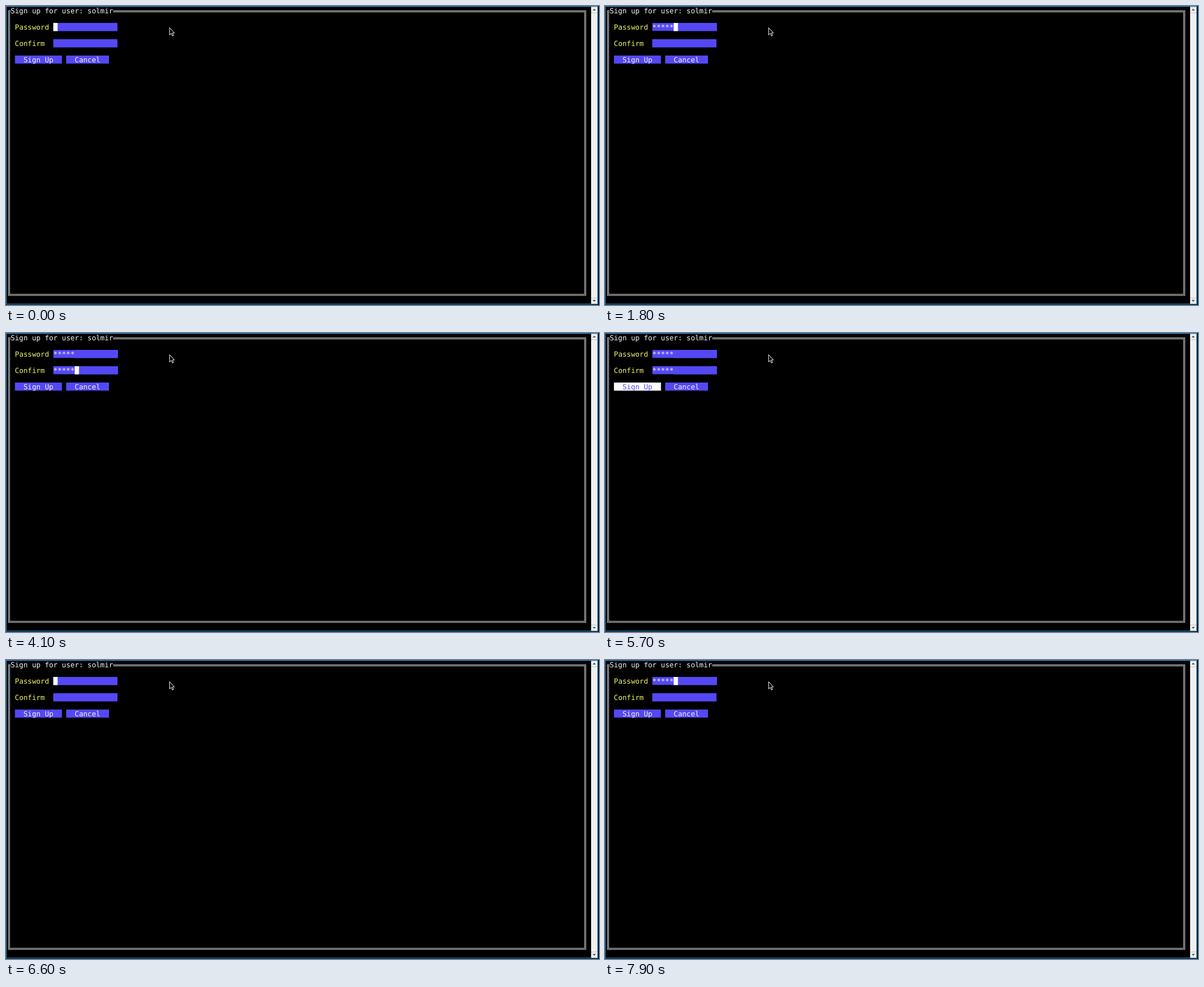
Write an HTML page that moves like this. It is 1054 by 531 pixels and loops after 8000 ms.

```html
<!DOCTYPE html>
<html lang="en">
<head>
<meta charset="utf-8">
<title>Terminal sign-up form</title>
<style>
  :root { --cell: 7.595px; --violet: #5448f4; }
  html, body { margin: 0; width: 100%; height: 100%; overflow: hidden; background: #000; }
  svg { display: block; }
  text {
    font: 12.615px "DejaVu Sans Mono", monospace;
    fill: #f4f4f4;
    white-space: pre;
    text-rendering: geometricPrecision;
  }
  .label { fill: #f1f56c; }
  .violet { fill: var(--violet); }
  .line { fill: none; stroke: #d8d8d8; }
  .blue { fill: #2389cc; }

  .form, .dialog, .focus, .typed, .caret { animation: 8s step-end infinite; }
  .form { animation-name: form; }
  .dialog { animation-name: dialog; }
  .focus { animation-name: focus; }
  .password .typed { animation-name: type-password; }
  .password .caret { animation-name: caret-password; }
  .confirm .typed { animation-name: type-confirm; }
  .confirm .caret { animation-name: caret-confirm; }

  @keyframes form { 0%, 82.5%, 100% { visibility: visible } 75% { visibility: hidden } }
  @keyframes dialog { 0%, 82.5%, 100% { visibility: hidden } 75% { visibility: visible } }
  @keyframes focus { 0%, 75%, 100% { opacity: 0 } 71.25% { opacity: 1 } }
  @keyframes caret-password { 0%, 75%, 100% { opacity: 1 } 37.5% { opacity: 0 } }
  @keyframes caret-confirm { 0%, 71.25%, 100% { opacity: 0 } 37.5% { opacity: 1 } }
  @keyframes type-password {
    0%, 75% { transform: none }
    15%, 91.25% { transform: translateX(calc(2 * var(--cell))) }
    16.25%, 92.5% { transform: translateX(calc(3 * var(--cell))) }
    20%, 96.25% { transform: translateX(calc(4 * var(--cell))) }
    22.5%, 98.75%, 100% { transform: translateX(calc(5 * var(--cell))) }
  }
  @keyframes type-confirm {
    0%, 75%, 100% { transform: none }
    40% { transform: translateX(var(--cell)) }
    41.25% { transform: translateX(calc(2 * var(--cell))) }
    43.75% { transform: translateX(calc(3 * var(--cell))) }
    46.25% { transform: translateX(calc(4 * var(--cell))) }
    51.25% { transform: translateX(calc(5 * var(--cell))) }
  }
</style>
</head>
<body>
<svg width="1054" height="531" viewBox="0 0 1054 531">
  <defs>
    <!-- A violet cover slides right to reveal the masked characters -->
    <g id="stars">
      <rect class="violet" width="114" height="14.4"/>
      <text y="11.7">*****</text>
    </g>
  </defs>

  <rect width="1054" height="531"/>

  <g class="form">
    <rect class="line" x="4.5" y="8.5" width="1026" height="505.5"/>
    <rect class="line" x="6.5" y="10.5" width="1022" height="501.5"/>
    <rect x="8.2" y="2" width="182.3" height="14"/>
    <text x="8.2" y="13">Sign up for user: solmir</text>

    <text class="label" x="15.8" y="41.8">Password</text>
    <svg class="password" x="84.1" y="30.1" width="114" height="14.4">
      <use href="#stars"/>
      <g class="typed">
        <rect class="violet" width="114" height="14.4"/>
        <rect class="caret" width="7.6" height="14.4" fill="#fff"/>
      </g>
    </svg>

    <text class="label" x="15.8" y="70.6">Confirm</text>
    <svg class="confirm" x="84.1" y="59" width="114" height="14.4">
      <use href="#stars"/>
      <g class="typed">
        <rect class="violet" width="114" height="14.4"/>
        <rect class="caret" width="7.6" height="14.4" fill="#fff"/>
      </g>
    </svg>

    <rect class="violet" x="15.9" y="88" width="83.5" height="14.3"/>
    <text x="31" y="99.5">Sign Up</text>
    <rect class="violet" x="107" y="88" width="76" height="14.3"/>
    <text x="122.1" y="99.5">Cancel</text>
    <g class="focus">
      <rect x="15.9" y="88" width="83.5" height="14.3" fill="#fff"/>
      <text class="violet" x="31" y="99.5">Sign Up</text>
    </g>
  </g>

  <g class="dialog">
    <rect class="violet" x="327.2" y="203.4" width="372" height="100.6"/>
    <rect class="line" x="330.5" y="209.5" width="366" height="88"/>
    <rect class="line" x="332.5" y="211.5" width="362" height="84"/>
    <text x="365.2" y="243.6">Password and confirmation is not match</text>
    <rect x="486.8" y="261" width="45.5" height="14.3" fill="#fff"/>
    <text x="501.9" y="272.5" style="fill:#000">OK</text>
  </g>

  <!-- Window edge and scrollbar -->
  <rect class="blue" width="1052" height="1.4"/>
  <rect class="blue" width="1" height="530"/>
  <rect class="blue" x="1051" width="1.4" height="530"/>
  <rect class="blue" y="528.8" width="1052" height="1.2"/>
  <rect x="1040" y="1.4" width="11" height="527.4" fill="#f0f0f0"/>
  <path d="M1040 12h11M1040 518.5h11" stroke="#c4c4c4"/>
  <path d="M1042.5 8l3-3.2 3 3.2zM1042.5 522l3 3.2 3-3.2z" fill="#555"/>

  <path d="M290.8 38.6v12.7l2.9-2.7 2.1 4.6 2-.9-2.1-4.4h3.6z" fill="#000" stroke="#fff"/>
</svg>
</body>
</html>
```
